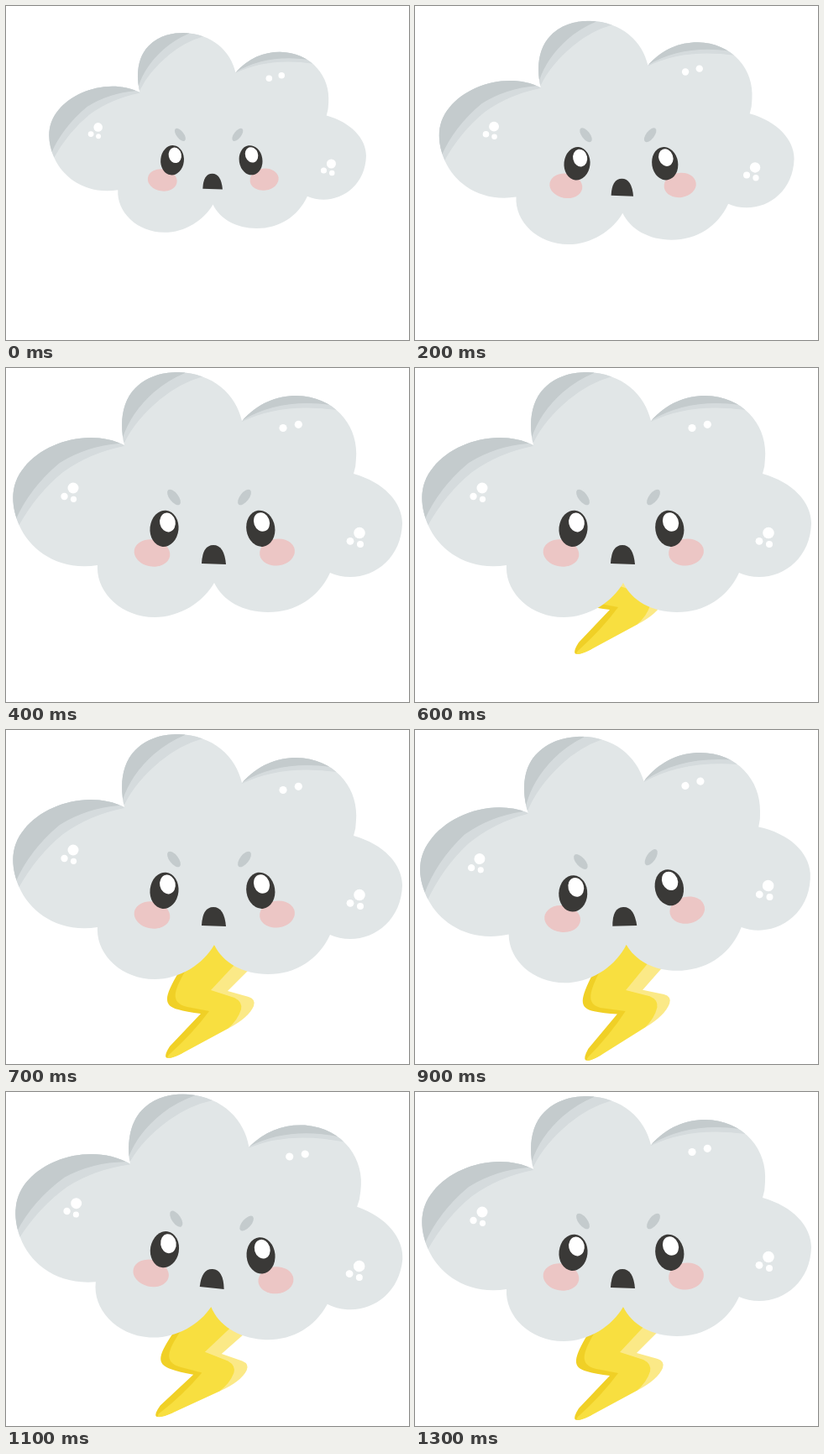
Recreate the animation shown at these times as an HTML page. Size 480 px wide and 398 px high, loop 1500 ms.

```html
<!DOCTYPE html>
<html lang="en">
<head>
<meta charset="utf-8">
<title>Angry storm cloud</title>
<style>
  html, body { margin: 0; width: 100%; height: 100%; overflow: hidden; background: #fff; }
  svg { display: block; width: 100vw; height: 100vh; }
  .body { fill: #e1e6e7; }
  .mid { fill: #d5dbdd; }
  .dark { fill: #c4cbcd; }
  .ink { fill: #3a3937; }
  .blush { fill: #ecc6c5; }
  .white { fill: #fff; }
</style>
</head>
<body>
<svg viewBox="0 0 480 398">
  <defs>
    <path id="outline" d="M141 92C135 66 138 40 154 24C170 8 190 5 205 5C247 6 274 32 281 63
      C300 42 322 33 346 33C393 34 420 70 417 107Q417 117 414 126C450 136 472 160 472 185
      C471 225 441 249 410 249Q397 249 386 244C372 274 345 291 312 291C282 291 258 277 248 256
      C235 279 207 297 177 297C137 297 107 267 109 235C62 242 29 217 16 188
      C5 163 5 138 22 118C46 88 100 72 141 92Z"/>
    <clipPath id="inside"><use href="#outline"/></clipPath>
  </defs>
  <g id="storm">
    <g id="bolt">
      <path fill="#f0d026" d="M248 256L206 288C189 317 186 328 205 333Q215 336 232 338
        L195 377Q188 388 191 390.500Q196 392 210 385L262 320Z"/>
      <path fill="#fbe987" d="M248 256L288 287L264 311L289 318Q298 321 295 329Q289 343 264 356L240 320Z"/>
      <path fill="#f8df40" d="M248 256L213 288C200 311 195 325 216 330L242 335
        Q222 362 194 387Q191 391 194 391Q200 391 214 383L264 356Q276 346 280 333Q282 324 272 319
        L244 310L272 280Z"/>
    </g>
    <use href="#outline" class="body"/>
    <g clip-path="url(#inside)">
      <path class="mid" d="M14 190Q36 150 68 124Q100 101 141 93L120 60L0 80V190Z"/>
      <path class="dark" d="M11 182Q28 143 64 113Q96 93 135 90L120 60L0 80V182Z"/>
      <path class="mid" d="M141 89Q154 62 184 37Q207 18 235 10V0H130V80Z"/>
      <path class="dark" d="M139 83Q149 53 176 29Q192 15 213 6V0H130V75Z"/>
      <path class="mid" d="M281 64Q328 41 394 50L390 25H300Z"/>
      <path class="dark" d="M282 62Q326 36 387 44L380 25H300Z"/>
    </g>
    <g id="face">
      <ellipse class="blush" rx="21.500" ry="16" transform="translate(174 220.500) rotate(10)"/>
      <ellipse class="blush" rx="21" ry="16" transform="translate(323 219.500) rotate(-8)"/>
      <ellipse class="ink" rx="17" ry="21.700" transform="translate(188.500 191.300) rotate(6)"/>
      <ellipse class="ink" rx="17" ry="21.700" transform="translate(303.300 191.300) rotate(-9)"/>
      <ellipse class="white" rx="9.300" ry="11.500" transform="translate(192.500 184) rotate(-12)"/>
      <ellipse class="white" rx="9.300" ry="11.500" transform="translate(304.500 183.500) rotate(-20)"/>
      <path class="ink" d="M233 233Q234 211 247 211Q260 211 262 234Z"/>
      <ellipse class="dark" rx="11" ry="5.300" transform="translate(200 154) rotate(52)"/>
      <ellipse class="dark" rx="11" ry="5.300" transform="translate(284 154) rotate(-52)"/>
    </g>
    <g class="white">
      <circle cx="80" cy="143" r="6.500"/><circle cx="69.500" cy="153" r="4.200"/><circle cx="80.500" cy="156.300" r="3.600"/>
      <circle cx="330" cy="71.500" r="4.600"/><circle cx="348.300" cy="67.300" r="4.600"/>
      <circle cx="421" cy="196.500" r="6.800"/><circle cx="410" cy="206.300" r="4.400"/><circle cx="422" cy="210" r="4"/>
    </g>
  </g>
</svg>
<script>
  const LOOP = 1500;
  // Held poses: the cloud swells, the bolt drops out, then both rock.
  const poses = [
    { at: 0, scale: 0.8145 },
    { at: 200, scale: 0.912 },
    { at: 400 },
    { at: 600, drop: -50 },
    { at: 700, drop: 0 },
    { at: 900, drop: 0, tilt: -3.6 },
    { at: 1100, drop: 0, tilt: 3.6 },
    { at: 1300, drop: 0 }
  ];
  const storm = document.getElementById("storm");
  const bolt = document.getElementById("bolt");

  function draw(time) {
    const { scale = 1, tilt = 0, drop } = poses.findLast(pose => pose.at <= time);
    storm.setAttribute("transform",
      `rotate(${tilt} 246 197) translate(240 150.6) scale(${scale}) translate(-240 -150.6)`);
    bolt.setAttribute("visibility", drop === undefined ? "hidden" : "visible");
    bolt.setAttribute("transform", `translate(0 ${drop ?? 0})`);
  }

  const start = performance.now();
  function tick() {
    draw((performance.now() - start) % LOOP);
    requestAnimationFrame(tick);
  }
  tick();
</script>
</body>
</html>
```
